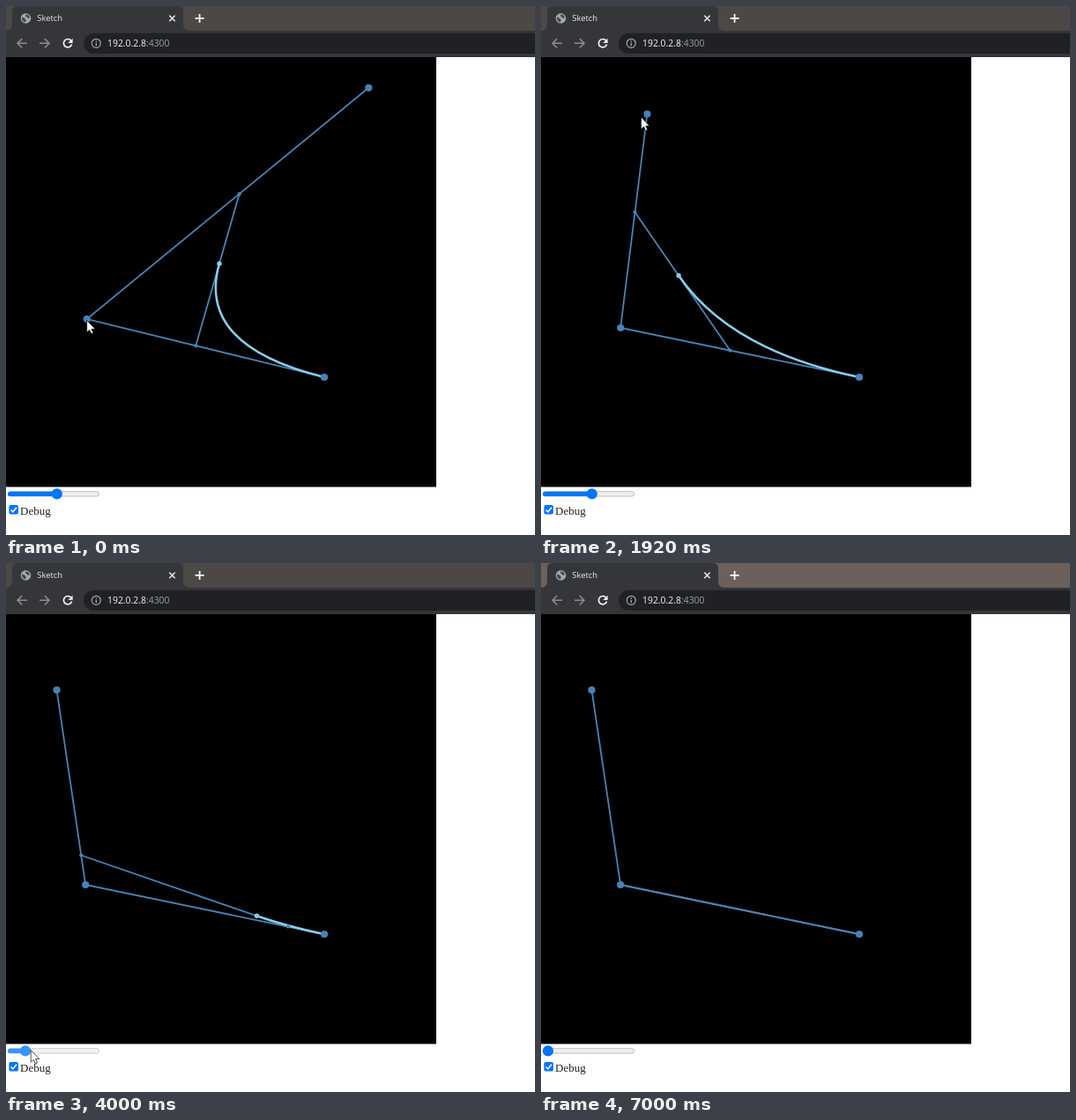
Animation of 600x600 px, one loop 7080 ms. Source, as an HTML page:

```html
<!DOCTYPE html>
<html lang="en">
<head>
<meta charset="utf-8">
<title>Sketch</title>
<style>
  html, body { margin: 0; width: 100%; height: 100%; overflow: hidden; background: #fff; }
  svg { display: block; width: 600px; height: 600px; }
  .ui { font-family: "Open Sans", "Noto Sans", sans-serif; font-weight: 500; }
  .icon { fill: none; stroke-width: 1.5; }
  .line { fill: none; stroke: #4682b4; stroke-width: 1.8; }
  .dot { fill: #4682b4; }
  #curve { fill: none; stroke: #87ceeb; stroke-width: 2.5; }
  #tip { fill: #87ceeb; }
</style>
</head>
<body>
<svg viewBox="0 0 600 600">
  <!-- browser bar -->
  <rect id="strip" width="600" height="29"/>
  <path fill="#35363a" d="M0 28Q7 28 7 21V6Q7 0 13 0H195Q201 0 201 6V21Q201 28 208 28H600V58H0Z"/>
  <circle cx="22.5" cy="14" r="5.8" fill="#a4a8ad"/>
  <path fill="#45474b" d="M18 12.5L21.5 14 23 16.5 21.5 18.5Q17.5 17 18 12.5ZM22 9.5L26 10.5 27 14 24.5 13.5 22.5 12Z"/>
  <text class="ui" x="35.3" y="17.4" font-size="9.4" fill="#eceef0">Sketch</text>
  <path class="icon" stroke="#e8eaed" d="M185.3 10.8l6.4 6.4m0-6.4l-6.4 6.4"/>
  <path class="icon" stroke="#f4f4f4" style="stroke-width:1.8" d="M214.6 14h10m-5-5v10"/>
  <path class="icon" stroke="#8b8d91" d="M24 42.3H13m5.2-5.2L13 42.3l5.2 5.2M38 42.3h11m-5.2-5.2l5.2 5.2-5.2 5.2"/>
  <path class="icon" stroke="#f1f3f4" style="stroke-width:1.7" d="M73.8 39.3A4.7 4.7 0 1 0 74.6 43.6"/>
  <path fill="#f1f3f4" d="M75.6 36.8V42H70.4Z"/>
  <rect x="88" y="30.7" width="560" height="23.4" rx="11.7" fill="#202124"/>
  <circle class="icon" cx="102.3" cy="42.3" r="5" stroke="#a2a6ab" style="stroke-width:1.2"/>
  <path class="icon" stroke="#a2a6ab" style="stroke-width:1.3" d="M102.3 39.3v1.4m0 1v3.6"/>
  <text class="ui" x="115" y="46.2" font-size="10.4" fill="#f1f3f4">192.0.2.8<tspan fill="#9aa0a6">:4300</tspan></text>

  <!-- drawing area -->
  <rect y="58" width="488" height="487.5"/>
  <path id="frame" class="line"/>
  <path id="link" class="line"/>
  <path id="curve"/>
  <circle id="midA" class="dot" r="2.1"/>
  <circle id="midB" class="dot" r="2.1"/>
  <circle id="tip" r="2.7"/>
  <circle id="p0" class="dot" r="4.1"/>
  <circle id="p1" class="dot" r="4.1"/>
  <circle id="p2" class="dot" r="4.1"/>

  <!-- controls -->
  <rect id="track" x="2.4" y="550.7" width="103.2" height="5.4" rx="2.7" stroke-width=".8"/>
  <rect id="fill" x="2" y="550.8" height="5.2" rx="2.6"/>
  <circle id="thumb" cy="553.4" r="6.1"/>
  <rect x="3.4" y="566" width="10.6" height="10.6" rx="2" fill="#0075ff"/>
  <path class="icon" stroke="#fff" style="stroke-width:1.6" d="M5.6 571.5l2.2 2.3 4.2-5"/>
  <text x="16" y="577" font-size="13" fill="#222" font-family="'Liberation Serif', serif">Debug</text>

  <path id="cursor" fill="#fff" stroke="#000" stroke-width=".7"
        d="M0 0V13.6L3.1 10.8 5.2 15.4 7.3 14.5 5.3 9.9H9.6Z"/>
</svg>
<script>
const LOOP = 7080, STEP = 250 / 3, LEAD = 0.18;
const $ = id => document.getElementById(id);
const set = (id, attrs) => {
  for (const key in attrs) $(id).setAttribute(key, attrs[key]);
};
const mix = (a, b, t) => a.map((v, i) => v + (b[i] - v) * t);
const place = (id, [cx, cy]) => set(id, { cx, cy });

// Smooth step from 0 to 1 between two times.
function ramp(k, from, to) {
  const u = Math.min(1, Math.max(0, (k - from) / (to - from)));
  return u * u * (3 - 2 * u);
}

const START = [361, 421];
const bendAt = k => mix([91.7, 355], [90.2, 365], ramp(k, 0, 3));

function endAt(k) {
  const s = ramp(k, 15.25, 25.85), via = [234.4, 76];
  return mix(mix([411.3, 92.8], via, s), mix(via, [57.5, 144], s), s);
}

const amountAt = k => 0.541 * (1 - ramp(k, 43, 47)) + 0.97 * ramp(k, 47, 51)
  - 0.86 * ramp(k, 52, 60.5) - 0.11 * ramp(k, 60.5, 64);
const thumbX = t => 8 + 92 * t;

// The pointer runs slightly ahead of whatever it drags.
function cursorAt(k) {
  const ahead = k + LEAD;
  const along = ramp(k, 3, 9) - 0.23 * Math.sin(Math.PI * ramp(k, 9, 15));
  const point = mix(bendAt(ahead), endAt(ahead), along);
  const grip = [thumbX(amountAt(ahead)) + 1.5, 552.5];
  const travel = ramp(k, 27, 42), letGo = ramp(k, 61, 66), leave = ramp(k, 67, 74);
  const [x, y] = mix([point[0], point[1] + 1.5], grip, travel);
  return [x + 253 * Math.sin(Math.PI * travel) ** 2 - 9.5 * letGo + 185 * leave,
          y + 13.5 * letGo + 37 * leave];
}

function sliderColors(k) {
  if (k >= 44 && k < 68) return ["#3793ff", "#f3f3f3", "#c0c0c0"];
  if (k >= 41 && k < 44) return ["#005cc8", "#e5e5e5", "#9a9a9a"];
  return ["#0075ff", "#efefef", "#b2b2b2"];
}

function draw(k) {
  const p1 = bendAt(k), p2 = endAt(k), t = amountAt(k);
  const a = mix(START, p1, t), b = mix(p1, p2, t), c = mix(a, b, t);
  set("frame", { d: `M${START}L${p1}L${p2}` });
  set("link", { d: `M${a}L${b}` });
  set("curve", { d: `M${START}Q${a} ${c}` });
  place("midA", a);
  place("midB", b);
  place("tip", c);
  place("p0", START);
  place("p1", p1);
  place("p2", p2);

  const [main, back, edge] = sliderColors(k), x = thumbX(t);
  set("track", { fill: back, stroke: edge });
  set("fill", { fill: main, width: x - 2 });
  set("thumb", { fill: main, cx: x });

  const strip = mix([75, 72, 69], [107, 97, 90], ramp(k, 75, 79));
  set("strip", { fill: `rgb(${strip.map(Math.round)})` });
  set("cursor", { transform: `translate(${cursorAt(k)})` });
}

function tick() {
  draw(Math.floor((performance.now() % LOOP + 4) / STEP) % 85);
  requestAnimationFrame(tick);
}
tick();
</script>
</body>
</html>
```
